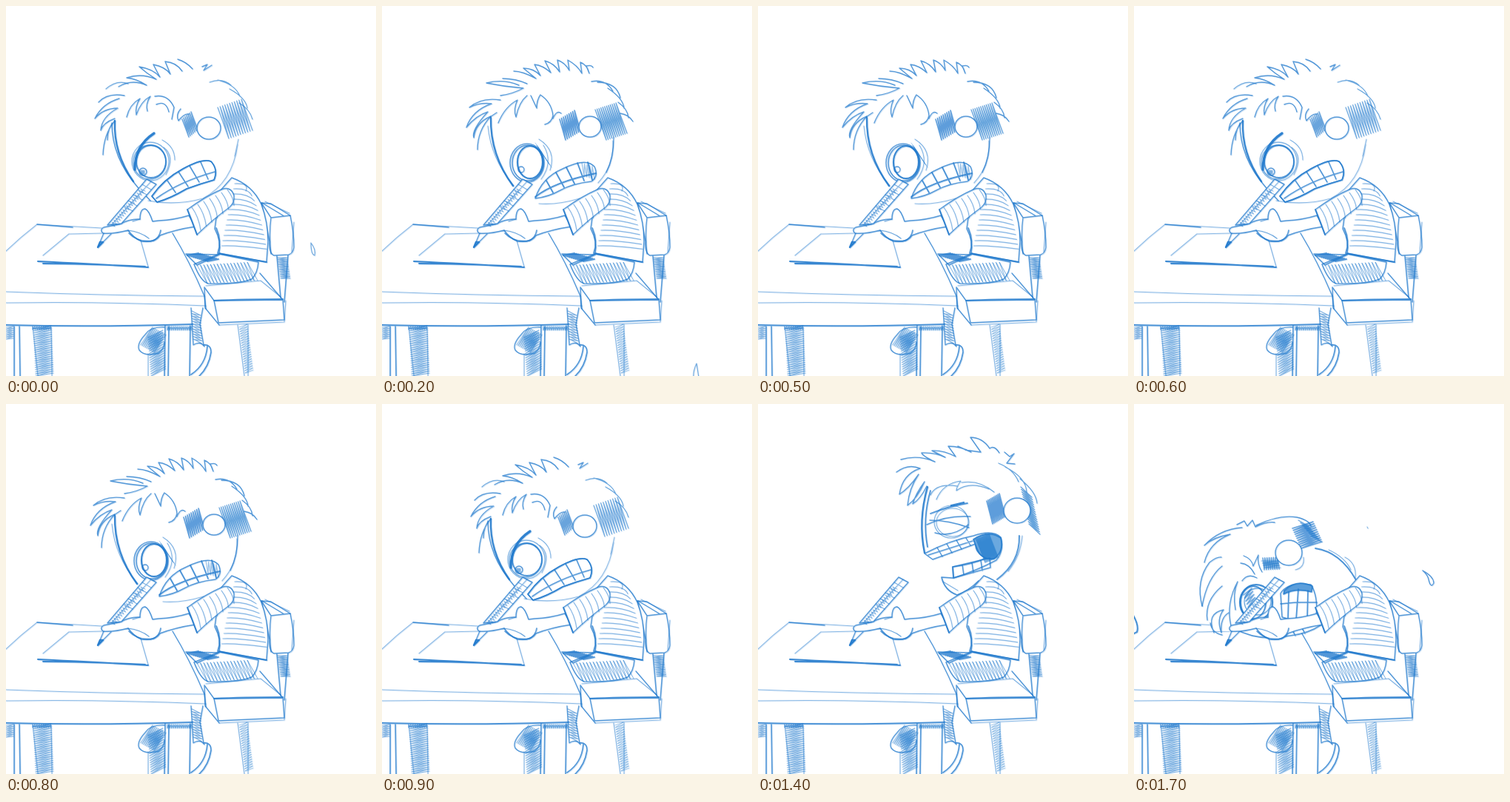
An HTML page with a canvas for the animation above (1800 ms loop, 500x500 px).

```html
<!DOCTYPE html>
<html>
<head>
<meta charset="utf-8">
<style>
html, body { margin: 0; width: 100%; height: 100%; overflow: hidden; background: #fff; }
canvas { display: block; }
</style>
</head>
<body>
<canvas id="stage" width="500" height="500"></canvas>
<script>
const c = document.getElementById('stage').getContext('2d');

// Pencil line: a main stroke plus a faint second pass beside it.
function ink(d, width = 1.4, alpha = .7, fill) {
  const path = new Path2D(d);
  if (fill) {
    c.globalAlpha = 1;
    c.fillStyle = fill;
    c.fill(path);
  }
  c.lineWidth = width;
  c.globalAlpha = alpha;
  c.stroke(path);
  c.save();
  c.translate(.9, .8);
  c.globalAlpha = alpha * .3;
  c.stroke(path);
  c.restore();
}
const light = d => ink(d, 1.2, .48);
const dark = d => ink(d, 2.3, .85);
const solid = (d, fill = '#fff') => ink(d, 1.5, .72, fill);

// Zigzag shading along the line x0,y0 - x1,y1; every stroke spans dx,dy.
function hatch(x0, y0, x1, y1, dx, dy, n, width = 1.1, alpha = .5) {
  let d = '';
  for (let i = 0; i <= n; i++) {
    const x = x0 + (x1 - x0) * i / n, y = y0 + (y1 - y0) * i / n;
    d += `${i ? 'L' : 'M'}${x} ${y}l${dx} ${dy}`;
  }
  ink(d, width, alpha);
}

function oval(x, y, rx, ry, width = 1.4, alpha = .7, fill) {
  ink(`M${x - rx} ${y}a${rx} ${ry} 0 1 1 ${2 * rx} 0a${rx} ${ry} 0 1 1 ${-2 * rx} 0`, width, alpha, fill);
}

function table() {
  light('M0 331Q20 312 42 295L130 300L182 306M0 386Q130 391 268 392M0 401Q130 399 270 405');
  ink('M225 307Q248 345 268 392L270 409M42 295L90 299');
  ink('M0 431Q120 434 252 430', 1.9, .75);
  light('M85 308L50 337M85 308L130 307M182 317L192 352');
  ink('M43 345Q110 348 192 353M50 348Q100 348 188 352', 2, .85);

  ink('M11 433L11 500M18 433L19 500M215 432L214 500M220 433L219 500M249 432L248 500', 1.7);
  hatch(0, 434, 0, 450, 10, -1, 6);
  hatch(37, 436, 40, 500, 24, -4, 22);
  hatch(36, 433, 60, 433, 0, 4, 8, 1.3, .6);
  hatch(192, 448, 196, 500, 20, -10, 17);
  light('M36 434L43 500M61 434L62 500M192 470L192 500');
  hatch(218, 433, 250, 433, 0, 5, 12, 1.3, .6);
}

function legs() {
  ink('M214 434Q195 433 188 444Q176 457 180 465Q187 474 206 469Q214 463 214 454');
  hatch(182, 458, 200, 468, 16, -24, 9);
  ink('M250 408L253 458Q262 452 268 460M266 408L262 430L267 458');
  hatch(251, 412, 253, 450, 12, 6, 11);
  ink('M267 458Q277 457 277 468Q274 488 261 500M272 460Q270 485 250 498', 1.7, .75);
}

function chair() {
  ink('M345 266L358 267L384 283Q389 306 389 326Q388 334 382 336L362 337Q355 334 356 318Z');
  ink('M345 266L358 286L384 283M358 286Q355 308 358 335M346 266L376 284');
  light('M350 264L383 280M389 292L386 332');
  ink('M366 338L371 394M381 337L376 400', 1.6);
  hatch(367, 340, 371, 368, 13, 0, 12, 1.1, .6);
  ink('M268 380L281 398L374 397L343 361M281 398L287 428L376 424L374 397M268 380L269 408L288 431');
  ink('M281 398Q320 396 374 396', 2, .7);
  light('M270 378L344 371L371 393M288 431L376 427L378 398');
  light('M313 431L322 500M327 430L327 500');
  hatch(315, 434, 323, 496, 11, -4, 20, 1, .4);
}

function body() {
  solid('M254 349Q263 372 273 375Q315 376 332 369Q340 361 341 346L288 335Z');
  hatch(258, 350, 326, 346, 14, 25, 15, 1, .5);
  hatch(245, 337, 272, 345, 15, -3, 10, 2, .7);
  ink('M243 335L288 336L258 350Z', 1.6);

  solid('M305 232Q333 242 345 268Q354 292 354 318L352 346L288 334Q291 318 282 301L289 250Z');
  for (let i = 0; i < 13; i++) {
    const k = i / 13, x = 309 - 19 * k, y = 240 + 91 * k;
    light(`M${x} ${y}Q${x + 20} ${y - 1} ${324 + 29 * Math.sqrt(k)} ${y + 4 + 6 * (1 - k)}`);
  }
  ink('M284 300Q292 318 286 334L352 346', 1.9);

  solid('M247 283Q228 289 206 290L198 291Q193 276 188 274Q181 274 181 288Q168 287 153 295L132 299Q126 303 131 307Q147 308 165 303Q171 312 183 318Q202 320 208 310Q229 302 256 298Z');
  ink('M165 303Q182 305 193 314M181 288L171 291', 1.2, .6);
  ink('M166 307Q178 320 199 317Q208 312 209 303', 1.7);

  solid('M245 275Q270 257 291 248Q304 243 308 256Q309 266 302 272Q280 288 258 309Z');
  for (let i = 0; i < 7; i++) {
    light(`M${251 + i * 8} ${272 - i * 4}q9 12 ${12 - i * .5} ${31 - i * 1.6}`);
  }
  ink('M245 275Q252 292 258 309', 1.8);
}

function pencil() {
  solid('M137 296L190 234L203 241L156 294Z');
  light('M143 295L196 237M178 248L190 255M172 255L184 262M165 263L177 270M159 270L171 277M184 241L196 248');
  hatch(141, 295, 182, 247, 6, 3, 17, 1, .45);
  ink('M132 307L124 326L142 308');
  dark('M124 326L127 319L131 319Z');
}

function glaring() {
  ink('M131 201Q132 173 147 155Q137 164 137 181M147 152Q131 158 128 168Q129 150 151 138Q132 138 120 152Q130 132 153 125M125 130Q137 117 160 121');
  ink('M152 109Q170 98 190 107Q176 98 163 97Q183 90 203 99Q190 91 180 82Q199 85 208 96Q203 87 199 79Q215 82 222 92L215 75Q230 76 238 88M232 72Q243 75 252 85M265 82L272 79L267 87L278 80');
  ink('M135 112Q150 99 165 105M275 103Q292 96 304 107M286 100Q310 106 316 122M302 112Q324 124 326 138M315 131Q329 139 333 153', 1.2, .6);
  hatch(286, 137, 318, 126, 15, 42, 10, 1.3, .55);
  ink('M163 150Q167 133 181 125Q174 136 176 147Q182 129 195 122Q188 133 191 142M201 122Q219 119 227 137L224 153M203 133Q216 127 220 143M236 139Q229 147 233 155Q241 145 247 146');
  hatch(238, 153, 250, 143, 9, 24, 6, 1.5, .6);
  oval(274, 165, 16, 15, 1.5, .7, '#fff');
  dark('M147 155Q145 199 172 237');
  ink('M143 158Q143 205 178 245L195 263', 1.5);
  light('M192 263Q230 270 266 260Q306 239 313 187M314 180L309 203M213 191Q229 203 216 228M211 181Q228 190 228 208');
  oval(195, 210, 25, 26, 1.3, .5);
  oval(196, 210, 20, 22, 1.8, .75, '#fff');
  oval(194, 211, 22, 23, 1.3, .6);
  oval(185, 224, 5, 5, 1.5, .7);
  hatch(182, 222, 187, 222, 0, 5, 4);
  ink('M174 221Q174 189 200 172', 3.3, .9);
  solid('M197 257Q213 234 239 220Q266 205 277 210Q287 221 281 235Q263 240 244 247Q222 260 204 265Z');
  ink('M197 257Q213 234 239 220Q266 205 277 210Q287 221 281 235Q263 240 244 247Q222 260 204 265Z', 1.6);
  ink('M203 260Q235 237 282 224M218 236L229 252M233 224L246 244M248 216L261 238M263 211L273 234', 1.6);
}

function gritting() {
  ink('M129 194Q129 168 147 149Q126 158 124 178Q120 168 143 143Q127 148 114 164Q122 141 148 132Q132 130 118 137Q134 123 160 127');
  ink('M160 121Q176 119 191 111Q166 109 141 104Q164 98 185 107M163 98Q181 98 196 105M178 88Q190 88 208 98L191 84Q205 84 214 94L206 79Q217 80 228 90L220 74Q232 77 240 89L237 73Q247 76 253 87L251 73Q264 80 270 91L268 76Q277 79 280 91L276 81Q283 79 285 83');
  ink('M283 102Q302 98 312 115M291 103Q317 103 322 124M305 111Q326 125 327 138M319 130Q332 139 333 151M322 145Q334 147 339 156', 1.3);
  hatch(288, 140, 316, 131, 15, 41, 11, 1.3, .6);
  ink('M146 150L155 144M157 158Q166 136 183 127Q177 140 181 150Q185 130 196 121M201 121L209 138Q209 127 214 120Q229 130 231 148Q229 158 220 160M231 152Q236 140 242 145');
  hatch(240, 153, 260, 141, 8, 28, 8, 1.6, .65);
  oval(281, 163, 15, 14, 1.5, .7, '#fff');
  dark('M147 151Q146 201 177 243');
  light('M143 162Q147 206 178 243M212 267Q237 269 267 260M312 182Q314 215 292 239M212 180Q236 195 227 222M218 188Q232 211 215 234');
  ink('M313 178Q313 205 303 225', 1.3);
  hatch(207, 185, 224, 211, 5, 7, 9, 1, .3);
  oval(196, 212, 23, 26, 1.6, .65);
  oval(200, 211, 17, 22, 2.2, .85, '#fff');
  oval(197, 212, 21, 24, 1.6, .7);
  oval(188, 221, 4, 4, 1.4, .7);
  solid('M207 260Q216 232 244 220Q276 204 287 217Q293 230 283 237Q257 240 241 249Q225 258 207 260Z');
  ink('M207 258Q232 238 289 226M222 236L231 252M235 225L246 245M249 218L260 240M264 212L273 236M278 211L284 235', 1.8, .75);
  hatch(270, 212, 284, 216, 3, 18, 4, 1.2, .4);
}

function yelling() {
  ink('M187 92Q203 80 219 87Q195 95 191 122Q203 115 217 95Q204 114 202 137Q215 128 225 105Q213 121 209 135Q219 129 228 111');
  ink('M193 75Q216 68 239 78Q222 70 221 66Q239 65 253 72L235 63Q250 62 267 71L257 57Q274 57 288 65L270 57M280 62L301 65L287 45Q303 45 313 60Q319 55 326 66M333 65L340 71L346 67L336 80L347 81');
  ink('M325 80Q345 88 352 105M334 85Q362 99 363 119M354 101Q376 119 377 134', 1.3, .6);
  hatch(355, 112, 366, 162, 15, 14, 15, 1.3, .6);
  ink('M233 123Q241 106 270 111M241 129Q250 107 274 104Q268 112 268 117Q286 104 312 115M275 106Q299 102 319 119', 1.2, .6);
  hatch(309, 131, 326, 121, 8, 31, 9, 1.6, .65);
  oval(350, 144, 18, 17, 1.5, .7, '#fff');
  dark('M229 112Q216 158 225 201');
  ink('M233 117Q222 155 229 193M233 148Q258 138 283 134', 1.8, .75);
  dark('M261 137L278 133');
  oval(261, 159, 23, 22, 1.2, .5);
  oval(263, 160, 22, 19, 1.1, .5);
  ink('M228 163Q255 150 287 152M232 157Q258 157 285 167M239 174Q262 181 284 163', 1.4);
  solid('M225 202Q260 184 291 178Q317 169 328 180Q332 200 322 211Q296 225 264 235L263 220Q292 216 308 208Q293 201 294 189L236 210Z');
  ink('M291 183Q312 169 328 181Q333 199 319 209Q302 211 296 196Z', 1.8, .8, '#6aa8df');
  hatch(295, 183, 312, 176, 12, 31, 10, 1.5, .6);
  ink('M242 194L249 206M255 189L262 201M268 184L275 196M281 181L287 191M230 204L290 185', 1.4);
  ink('M263 220L313 208L314 221L264 235ZM276 217L278 231M289 214L291 228M301 211L303 225', 1.6);
  ink('M263 235L248 234Q252 252 269 258Q285 252 298 239', 1.7, .75);
  ink('M353 178Q354 214 323 237', 2, .7);
  light('M357 178Q355 205 338 226M250 240L270 252');
}

function slammed() {
  c.globalAlpha = 1;
  c.fillStyle = '#fff';
  c.fill(new Path2D('M106 306Q83 258 98 210Q130 162 215 153Q246 167 258 195Q287 203 300 240L250 300Q190 330 150 308Z'));
  ink('M92 273Q83 239 102 214Q112 206 118 207M95 214Q102 187 130 176Q107 180 95 191Q116 169 146 167M139 163L149 158L153 165L160 157L164 166Q181 158 190 160M165 164Q196 149 220 153Q237 157 239 165');
  ink('M92 273Q99 235 119 219M99 292Q95 266 119 246M108 309Q97 283 121 278Q111 291 118 309Q116 289 128 282M131 300Q124 269 140 240Q133 256 137 278M103 296Q105 309 119 312');
  hatch(214, 168, 226, 195, 28, -9, 10, 1.6, .65);
  hatch(222, 157, 239, 178, 14, 8, 6, 1.4, .55);
  ink('M148 205Q159 209 161 219L168 204Q166 216 173 227M144 215Q156 216 163 230M146 239Q154 228 166 235', 1.3);
  hatch(174, 208, 194, 207, 2, 16, 7, 1.5, .65);
  hatch(172, 212, 176, 221, 22, 0, 3, 1.2, .5);
  oval(209, 201, 18, 17, 1.5, .7, '#fff');
  ink('M229 207Q231 221 218 224', 1.2, .5);
  ink('M245 195Q279 200 300 238', 1.8, .75);
  light('M285 207Q301 215 299 235M263 197Q285 207 293 224');
  oval(165, 268, 22, 24, 2.2, .8, '#fff');
  oval(161, 268, 17, 22, 1.8, .75);
  oval(167, 267, 18, 18, 1.3, .6);
  hatch(148, 258, 157, 283, 11, -9, 6, 1.5, .6);
  solid('M198 256Q207 240 239 244Q249 260 246 286Q222 296 200 288Z');
  ink('M203 252Q219 236 241 246L240 254Q219 248 202 257Z', 1.6, .8, '#5b9edb');
  ink('M198 270Q222 267 247 268M222 250L219 291M209 254L208 289M235 252L234 290', 1.7, .75);
  ink('M135 303Q168 322 211 313Q236 310 252 299M200 302Q219 307 247 290M226 301L231 310M213 304L218 313', 1.6);
}

// One pose every 100 ms: drawing, offset and tilt of the head.
const shiver = [[glaring], [gritting, 1, 1, .012], [gritting]];
const poses = [
  ...shiver, ...shiver, ...shiver, ...shiver,
  [gritting, 19, -10], [yelling, -9, 7, -.03], [yelling], [yelling, -2, 2],
  [slammed, 32, -52, .08], [slammed]
];

function sweat(step) {
  if (step === 17) {
    ink('M390 225Q405 233 405 242Q401 250 398 237Q397 231 390 225');
    ink('M-2 284Q7 299 4 308L-2 311', 2, .8);
    light('M315 166l1 2');
  }
  if (step === 0) ink('M412 320Q419 329 417 337Q412 336 412 320', 1.2, .6);
  if (step === 1) ink('M420 398Q426 408 423 416Q417 414 420 398', 1.2, .6);
  if (step === 2) ink('M425 483Q420 494 421 502M425 483L428 502', 1.2, .6);
}

function draw(now) {
  const step = Math.floor(now % 1800 / 100);
  const [head, dx = 0, dy = 0, tilt = 0] = poses[step];
  c.globalAlpha = 1;
  c.fillStyle = '#fff';
  c.fillRect(0, 0, 500, 500);
  c.strokeStyle = '#1f78cc';
  c.lineCap = c.lineJoin = 'round';
  legs();
  table();
  chair();
  c.save();
  c.translate(240 + dx, 240 + dy);
  c.rotate(tilt);
  c.translate(-240, -240);
  head();
  c.restore();
  body();
  pencil();
  sweat(step);
}

const start = performance.now();
function tick() {
  draw(performance.now() - start);
  requestAnimationFrame(tick);
}
tick();
</script>
</body>
</html>
```
